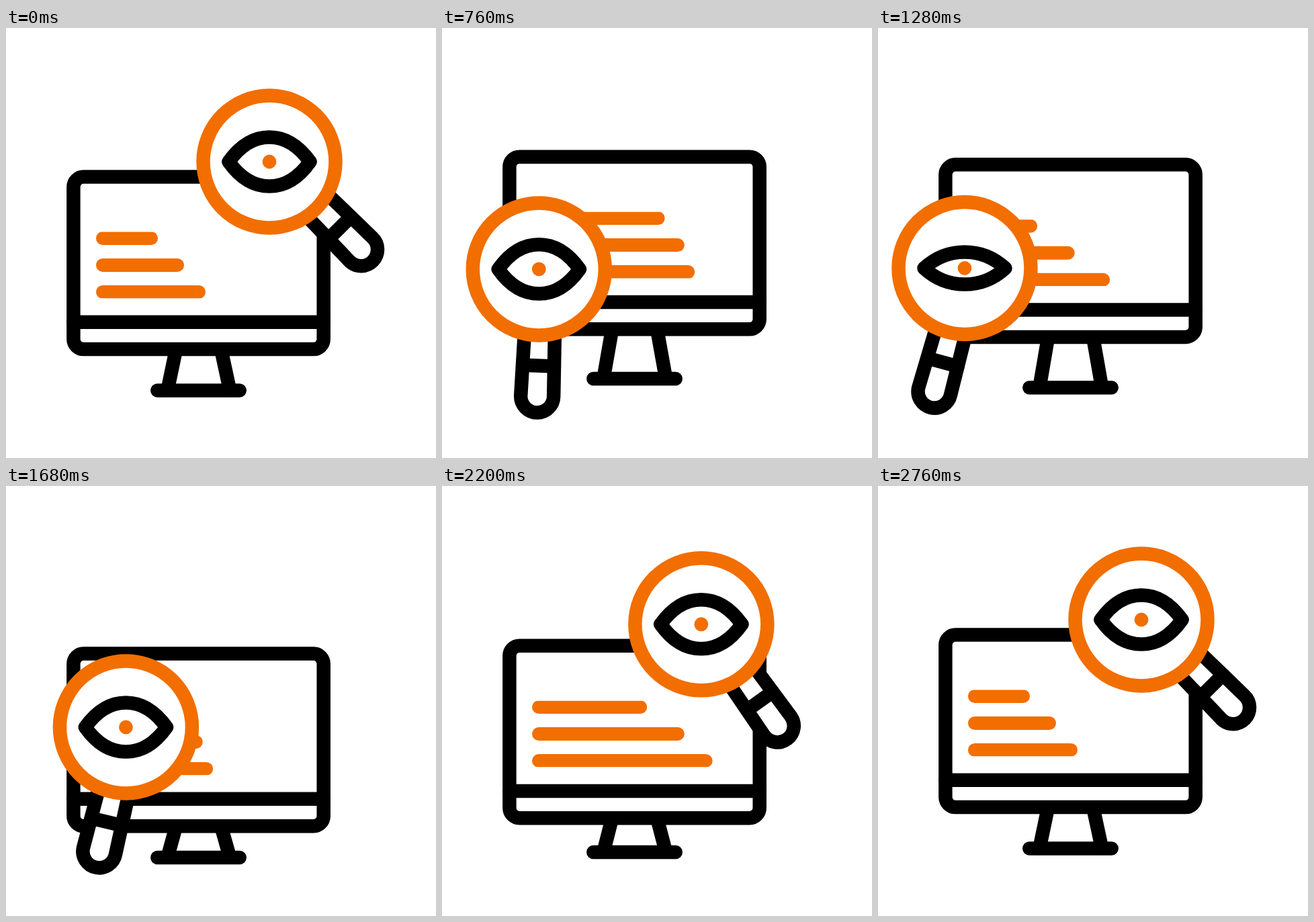
Animation, 640 px wide and 640 px high, one loop 3 s. Source, as an HTML page:

```html
<!DOCTYPE html>
<html lang="en">
<head>
<meta charset="utf-8">
<title>Screen inspection</title>
<style>
  html, body { margin: 0; width: 100%; height: 100%; overflow: hidden; background: #fff; }
  svg { display: block; width: 100vw; height: 100vh; }
  .ink { fill: none; stroke: #000; stroke-width: 20.5; stroke-linecap: round; stroke-linejoin: round; }
  .bar { stroke: #f26e00; stroke-width: 20; stroke-linecap: round; }
  .ring { fill: #fff; stroke: #f26e00; stroke-width: 20.5; }
  .pupil { fill: #f26e00; }
  .solid { fill: #fff; }
</style>
</head>
<body>
<svg viewBox="0 0 640 640">
  <defs>
    <clipPath id="textArea"><rect x="120" y="303.5" width="330" height="98.7"/></clipPath>
    <path id="route" d="M392 199C290 311 249 372 129 357.5"/>
  </defs>
  <path id="legs" class="ink"/>
  <path id="base" class="ink" d="M225.3 539.4H347.7"/>
  <g id="monitor">
    <rect class="ink solid" x="100.4" y="221.5" width="372.3" height="256.6" rx="15"/>
    <path class="ink" d="M100.4 437.8H472.7"/>
    <g clip-path="url(#textArea)">
      <path class="bar"/>
      <path class="bar"/>
      <path class="bar"/>
    </g>
  </g>
  <g id="glass">
    <g id="handle">
      <path class="ink solid" d="M-20.6 90L-26 189A24.5 24.5 0 0 0 23 189L24.2 90"/>
      <path class="ink" d="M-23 143L23.5 144.5"/>
    </g>
    <circle class="ring" r="98.5"/>
    <circle class="pupil" r="10.4"/>
    <path id="eye" class="ink"/>
  </g>
</svg>
<script>
const $ = id => document.getElementById(id);
const bars = [...document.querySelectorAll('.bar')];
const route = $('route');
const routeLength = route.getTotalLength();

const STEP = 40, HOLD = 240, LOOP = 3000, LAST = 64;

const smooth = t => t * t * (3 - 2 * t);

// cubic-bezier(.3, .1, .15, 1)
function glide(t) {
  const at = (u, a, b) => 3 * u * (1 - u) ** 2 * a + 3 * u * u * (1 - u) * b + u ** 3;
  let lo = 0, hi = 1;
  for (let i = 0; i < 24; i++) {
    const mid = (lo + hi) / 2;
    if (at(mid, 0.3, 0.15) < t) lo = mid; else hi = mid;
  }
  return at(lo, 0.1, 1);
}

// Value at time n on a list of [time, value] keys
function track(n, keys, ease = smooth) {
  if (n <= keys[0][0]) return keys[0][1];
  for (let i = 1; i < keys.length; i++) {
    const [t0, v0] = keys[i - 1], [t1, v1] = keys[i];
    if (n <= t1) return v0 + (v1 - v0) * ease((n - t0) / (t1 - t0));
  }
  return keys[keys.length - 1][1];
}

const screenKeys = [[0, 0], [20, -38], [40, 32.3], [60, 0]];
const baseKeys = [[0, 0], [16, -18.2], [41, 16], [56, 0]];
const barKeys = [[0, 0], [15, 107], [30, 0], [45, 107], [60, 0]];
const moveKeys = [[0, 0], [20, 1], [34, 1], [55, 0]];
const turnKeys = [[0, -46.7], [20, 13.3], [35, 13.3], [55, -46.7]];
const blinkKeys = [0, 25, 50].flatMap(s => [[s, 1], [s + 5, 0.03], [s + 6, 0.03], [s + 11, 1]]);
const barEnds = [216, 255, 287];

function draw(n) {
  const screen = track(n, screenKeys), base = track(n, baseKeys);
  $('monitor').setAttribute('transform', `translate(0 ${screen})`);
  $('base').setAttribute('transform', `translate(0 ${base})`);
  const top = 478 + screen, foot = 539 + base;
  $('legs').setAttribute('d', `M253.2 ${top}L240.4 ${foot}M320 ${top}L333.2 ${foot}`);

  bars.forEach((bar, i) => {
    const end = barEnds[i] + track(n - 2 * i, barKeys);
    bar.setAttribute('d', `M144 ${312.9 + 40 * i}H${end}`);
  });

  const p = route.getPointAtLength(routeLength * track(n, moveKeys, glide));
  $('glass').setAttribute('transform', `translate(${p.x} ${p.y})`);
  $('handle').setAttribute('transform', `rotate(${track(n, turnKeys)})`);

  const h = 36.6 * track(n, blinkKeys), k = h * 0.56;
  $('eye').setAttribute('d',
    `M-60.5 0C-46 ${-k} -26 ${-h} 0 ${-h}S46 ${-k} 60.5 0C46 ${k} 26 ${h} 0 ${h}S-46 ${k} -60.5 0Z`);
}

function tick() {
  const t = performance.now() % LOOP;
  draw(t < HOLD ? 0 : Math.min(LAST, Math.floor((t - HOLD) / STEP) + 1));
  requestAnimationFrame(tick);
}
tick();
</script>
</body>
</html>
```
